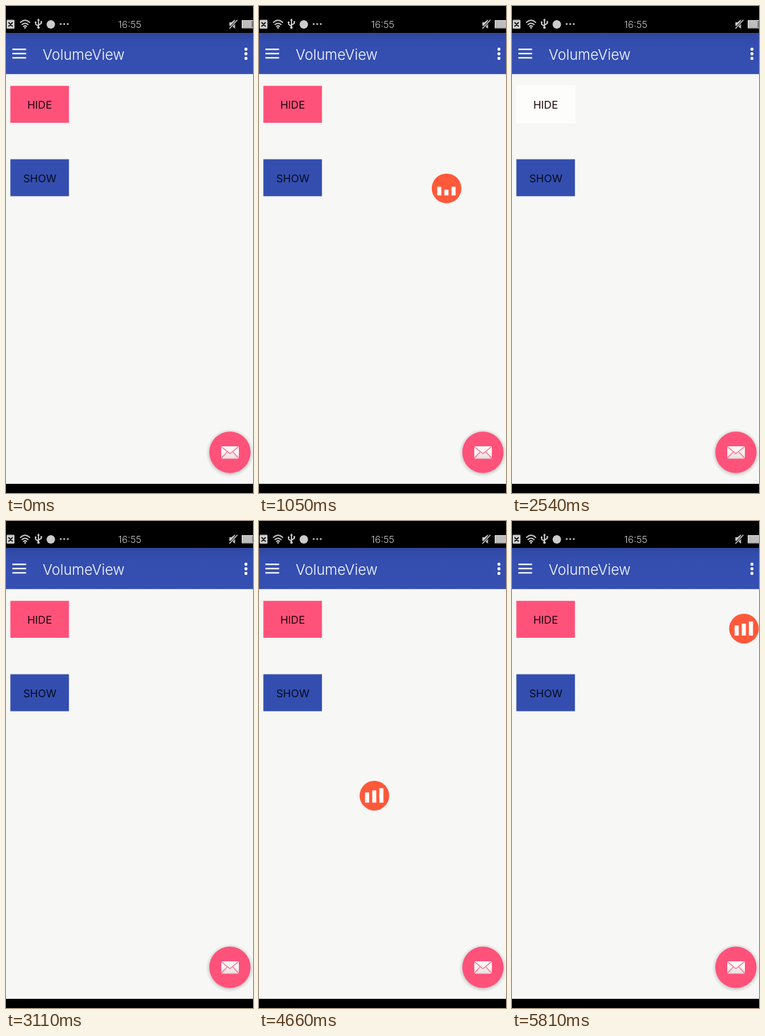
Write an HTML page that moves like this. It is 350 px wide and 688 px high and loops after 5850 ms.

```html
<!DOCTYPE html>
<html lang="en">
<head>
<meta charset="utf-8">
<title>VolumeView</title>
<style>
  html, body { margin: 0; width: 100%; height: 100%; overflow: hidden; background: #f7f7f5; }
  svg { display: block; width: 350px; height: 688px; }
  text { font-family: Inter, Roboto, sans-serif; font-weight: 350; }
  .label { font-size: 15px; font-weight: 400; text-anchor: middle; }
</style>
</head>
<body>
<svg viewBox="0 0 350 688">
  <defs>
    <linearGradient id="bar" x2="0" y2="1">
      <stop offset="0" stop-color="#2f479f"/>
      <stop offset=".25" stop-color="#344eb0"/>
      <stop offset="1" stop-color="#354fb2"/>
    </linearGradient>
    <linearGradient id="paper" x2="0" y2="1">
      <stop offset=".4" stop-color="#fdf8f6"/>
      <stop offset="1" stop-color="#e6dedb"/>
    </linearGradient>
    <radialGradient id="halo">
      <stop offset=".86" stop-color="#cfcfcd"/>
      <stop offset=".93" stop-color="#e6e6e4"/>
      <stop offset="1" stop-color="#f1f1ef"/>
    </radialGradient>
  </defs>

  <rect width="350" height="688" fill="#f7f7f5"/>
  <rect width="350" height="38"/>
  <rect y="675" width="350" height="13"/>
  <rect y="38" width="350" height="58.2" fill="url(#bar)"/>

  <!-- status bar -->
  <g fill="#ccc" stroke-linecap="round">
    <rect x="1" y="19.5" width="11" height="12.5" rx="1"/>
    <path d="M4 23.5l5 5m0-5l-5 5" stroke="#000" stroke-width="1.6"/>
    <g fill="none" stroke="#ccc" stroke-width="1.7">
      <path d="M20.5 23.2q6.5-6 13 0M22.8 26.2q4.2-3.8 8.4 0M24.8 28.8q2.2-2 4.4 0"/>
      <path d="M46 20v10M42 23.5v2.3l4 2.7M50 22.5v2l-4 2.5"/>
    </g>
    <circle cx="27" cy="30.7" r="1.3"/>
    <path d="M46 17.5l2 3h-4z"/>
    <circle cx="46" cy="30.5" r="1.8"/>
    <circle cx="42" cy="23" r="1.3"/>
    <circle cx="50" cy="22.5" r="1.3"/>
    <circle cx="63.5" cy="26" r="6"/>
    <circle cx="77.5" cy="25.5" r="1.3"/>
    <circle cx="82.5" cy="25.5" r="1.3"/>
    <circle cx="87.5" cy="25.5" r="1.3"/>
    <text x="159" y="31" font-size="13.5">16:55</text>
    <path d="M316.5 23h3l5-4v13l-5-4h-3z"/>
    <path d="M317 31.5l10.5-11.5" stroke="#000" stroke-width="3"/>
    <path d="M317 31.5l10.5-11.5" stroke="#ccc" stroke-width="1.3"/>
    <rect x="334.5" y="20.5" width="24" height="10.5" fill="#777" stroke="#ddd"/>
    <rect id="charge" x="335" y="21" height="9.5" fill="#bdbdbd"/>
  </g>

  <!-- app bar -->
  <g fill="#fff">
    <path d="M9 61.2h19.5M9 67.2h19.5M9 73.2h19.5" stroke="#fff" stroke-width="2"/>
    <text x="52" y="76.3" font-size="20.3">VolumeView</text>
    <circle cx="340" cy="61" r="2.2"/>
    <circle cx="340" cy="67.5" r="2.2"/>
    <circle cx="340" cy="74" r="2.2"/>
  </g>

  <!-- buttons -->
  <rect x="6.2" y="112.8" width="83" height="52.2" fill="#ff527a"/>
  <rect id="hideFlash" x="6" y="112" width="84" height="54" fill="#fdfdfc"/>
  <text class="label" x="47.7" y="145.2" fill="#1c060d">HIDE</text>
  <rect x="6.2" y="216.5" width="83" height="52.2" fill="#344eb0"/>
  <rect id="showFlash" x="6" y="216" width="84" height="53" fill="#fdfdfc"/>
  <text class="label" x="48" y="249" fill="#070b1c">SHOW</text>

  <!-- mail button -->
  <circle cx="317.3" cy="631.5" r="33.5" fill="url(#halo)"/>
  <circle cx="317.3" cy="630.5" r="29.2" fill="#ff527a"/>
  <rect x="305" y="622" width="25" height="17.5" rx="1" fill="url(#paper)"/>
  <path d="M305 622.5l12.3 10 12.3-10M305 639l8.3-8.8M329.8 639l-8.3-8.8"
        fill="none" stroke="#ff6b8e" stroke-width="1.2"/>

  <!-- floating volume badge -->
  <g id="badge">
    <circle r="21" fill="#ff593b"/>
    <g id="bars" fill="#fff"></g>
  </g>
</svg>
<script>
const LOOP = 5850, DRAG_STEP = 124, WAVE_STEP = 135, RISE = 270, PERIOD = 1160;
const LOW = [12, 8, 12], HIGH = [14.3, 17.3, 20.3];
const $ = id => document.getElementById(id);

const home = [325, 162], corner = [49, 608], middle = [163.5, 388], edge = [328.7, 152];
const drags = [
  { start: 800, steps: 5, from: home, to: corner },
  { start: 1420, steps: 2, from: corner, to: middle },
  { start: 5186, steps: 5, from: middle, to: edge }
];
const visits = [{ from: 240, to: 2540 }, { from: 4390, to: LOOP }];

const mix = (a, b, u) => a + (b - a) * u;
const hold = (t, step) => Math.floor(t / step) * step;
const ease = u => 1 / (1 + ((1 - u) / u) ** 3.2);

function position(t) {
  const drag = drags.findLast(d => t >= d.start);
  if (!drag) return home;
  const u = Math.min(1, Math.floor((t - drag.start) / DRAG_STEP) / drag.steps);
  return drag.from.map((a, i) => mix(a, drag.to[i], ease(u)));
}

// The bars rise once, then swing between high and low.
function level(age) {
  if (age < RISE) return age / RISE;
  return (1 + Math.cos((age - RISE) / PERIOD * 2 * Math.PI)) / 2;
}

const pressed = (t, from, to) => t >= from && t < to ? 1 : 0;

const bars = LOW.map((_, i) => {
  const bar = document.createElementNS("http://www.w3.org/2000/svg", "rect");
  bar.setAttribute("x", -13.2 + i * 10.1);
  bar.setAttribute("width", 5.8);
  return $("bars").appendChild(bar);
});

function draw(t) {
  const visit = visits.find(v => t >= v.from && t < v.to);
  $("badge").setAttribute("visibility", visit ? "visible" : "hidden");
  if (visit) {
    const loud = level(hold(t - visit.from, WAVE_STEP));
    $("badge").setAttribute("transform", `translate(${position(t)})`);
    bars.forEach((bar, i) => {
      const h = mix(LOW[i], HIGH[i], loud);
      bar.setAttribute("y", 9.8 - h);
      bar.setAttribute("height", h);
    });
  }
  $("charge").setAttribute("width", 13 + Math.floor(t / 400) % 3);
  $("hideFlash").setAttribute("opacity", mix(pressed(t, 2540, 2690), pressed(t, 2540, 2840), .4));
  $("showFlash").setAttribute("opacity", Math.max(pressed(t, 120, 240), pressed(t, 4240, 4390)));
}

const start = performance.now();
function tick() {
  draw((performance.now() - start) % LOOP);
  requestAnimationFrame(tick);
}
tick();
</script>
</body>
</html>
```
